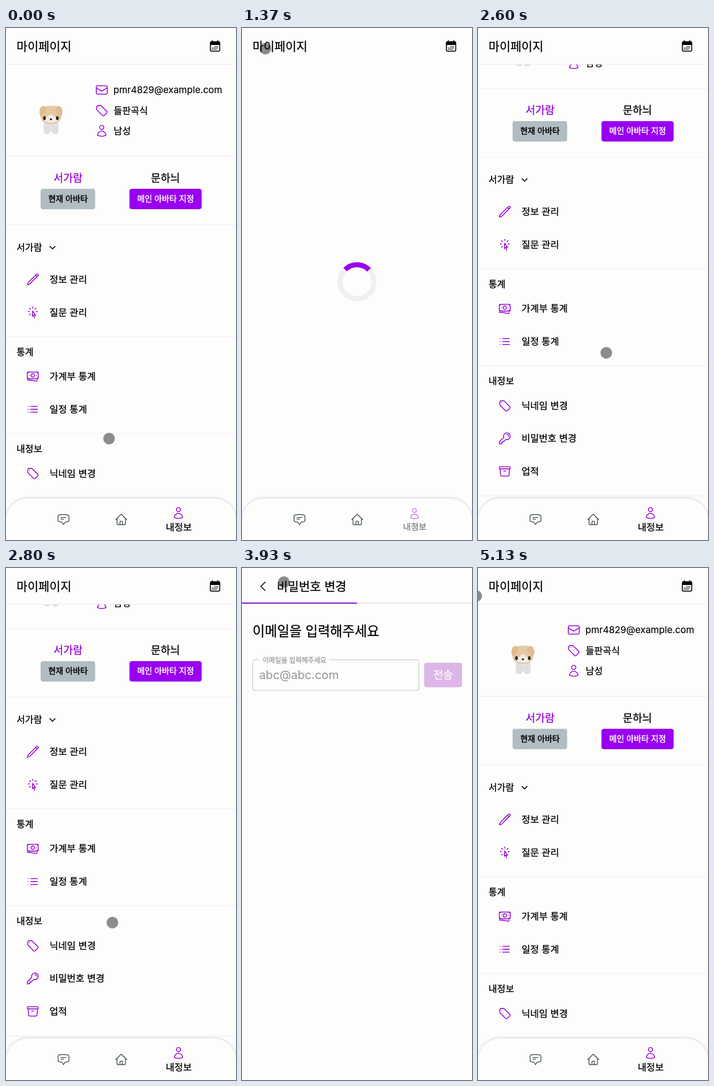
Recreate the animation shown at these times as an HTML page. Size 502 by 1116 pixels, loop 5.16 s.

```html
<!DOCTYPE html>
<html lang="ko">
<head>
<meta charset="utf-8">
<title>마이페이지</title>
<style>
  html, body { margin: 0; width: 100%; height: 100%; overflow: hidden; background: #fdfdfc; }
  svg { display: block; width: 100%; height: 100%; }
  text { font-family: "Noto Sans CJK KR", "Noto Sans CJK", "Noto Sans CJK JP", sans-serif; fill: currentColor; stroke: currentColor; stroke-width: .35px; }
  text.latin { font-family: Inter, sans-serif; stroke-width: .15px; }
  text.strong { stroke-width: .6px; }
  .bar { filter: drop-shadow(0 -2px 2.5px rgba(40, 30, 60, .16)); }
</style>
</head>
<body>
<svg id="stage" viewBox="0 0 502 1116" preserveAspectRatio="none"></svg>
<script>
const LOOP = 5160;
const VIOLET = '#9400d3', BRIGHT = '#9900f0', SLATE = '#4c5a5c', PAPER = '#fdfdfc';

const ICONS = {
  mail: 'M21.75 6.75v10.5a2.25 2.25 0 01-2.25 2.25h-15a2.25 2.25 0 01-2.25-2.25V6.75m19.5 0A2.25 2.25 0 0019.5 4.5h-15a2.25 2.25 0 00-2.25 2.25m19.5 0v.243a2.25 2.25 0 01-1.07 1.916l-7.5 4.615a2.25 2.25 0 01-2.36 0L3.32 8.91a2.25 2.25 0 01-1.07-1.916V6.75',
  tag: 'M9.568 3H5.25A2.25 2.25 0 003 5.25v4.318c0 .597.237 1.17.659 1.591l9.581 9.581c.699.699 1.78.872 2.607.33a18.095 18.095 0 005.223-5.223c.542-.827.369-1.908-.33-2.607L11.16 3.66A2.25 2.25 0 009.568 3zM6 6h.01',
  user: 'M15.75 6a3.75 3.75 0 11-7.5 0 3.75 3.75 0 017.5 0zM4.501 20.118a7.5 7.5 0 0114.998 0A17.933 17.933 0 0112 21.75c-2.676 0-5.216-.584-7.499-1.632z',
  pencil: 'M16.862 4.487l1.687-1.688a1.875 1.875 0 112.652 2.652L6.832 19.82a4.5 4.5 0 01-1.897 1.13l-2.685.8.8-2.685a4.5 4.5 0 011.13-1.897L16.863 4.487zm0 0L19.5 7.125',
  click: 'M15.042 21.672L13.684 16.6m0 0l-2.51 2.225.569-9.47 5.227 7.917-3.286-.672zM12 2.25V4.5m5.834.166l-1.591 1.591M20.25 10.5H18M7.757 14.743l-1.59 1.59M6 10.5H3.75m4.007-4.243l-1.59-1.59',
  cash: 'M2.25 18.75a60.07 60.07 0 0115.797 2.101c.727.198 1.453-.342 1.453-1.096V18.75M3.75 4.5v.75A.75.75 0 013 6h-.75M3.375 4.5h17.25a1.125 1.125 0 011.125 1.125v9.75a1.125 1.125 0 01-1.125 1.125H3.375a1.125 1.125 0 01-1.125-1.125v-9.75A1.125 1.125 0 013.375 4.5zM20.25 4.5v.75c0 .414.336.75.75.75h.75M21.75 15H21a.75.75 0 00-.75.75v.75M3.75 16.5v-.75A.75.75 0 003 15h-.75M15 10.5a3 3 0 11-6 0 3 3 0 016 0zM18 10.5h.01M6 10.5h.01',
  list: 'M8.25 6.75h12M8.25 12h12m-12 5.25h12M3.75 6.75h.01M3.75 12h.01M3.75 17.25h.01',
  key: 'M15.75 5.25a3 3 0 013 3m3 0a6 6 0 01-7.029 5.912c-.563-.097-1.159.026-1.563.43L10.5 17.25H8.25v2.25H6v2.25H2.25v-2.818c0-.597.237-1.17.659-1.591l6.499-6.499c.404-.404.527-1 .43-1.563A6 6 0 1121.75 8.25z',
  box: 'M20.25 7.5l-.625 10.632a2.25 2.25 0 01-2.247 2.118H6.622a2.25 2.25 0 01-2.247-2.118L3.75 7.5M10 11.25h4M3.375 7.5h17.25c.621 0 1.125-.504 1.125-1.125v-1.5c0-.621-.504-1.125-1.125-1.125H3.375c-.621 0-1.125.504-1.125 1.125v1.5c0 .621.504 1.125 1.125 1.125z',
  home: 'M2.25 12l8.954-8.955c.44-.439 1.152-.439 1.591 0L21.75 12M4.5 9.75v10.125c0 .621.504 1.125 1.125 1.125H9.75v-4.875c0-.621.504-1.125 1.125-1.125h2.25c.621 0 1.125.504 1.125 1.125V21h4.125c.621 0 1.125-.504 1.125-1.125V9.75M8.25 21h8.25',
  chat: 'M7.5 8.25h9m-9 3H12m-9.75 1.51c0 1.6 1.123 2.994 2.707 3.227 1.129.166 2.27.293 3.423.379.35.026.67.21.865.501L12 21l2.755-4.133a1.14 1.14 0 01.865-.501 48.172 48.172 0 003.423-.379c1.584-.233 2.707-1.626 2.707-3.228V6.741c0-1.602-1.123-2.995-2.707-3.228A48.394 48.394 0 0012 3c-2.392 0-4.744.175-7.043.513C3.373 3.746 2.25 5.14 2.25 6.741v6.018z'
};

const icon = (name, x, y, color = VIOLET, s = 1.22) =>
  `<path d="${ICONS[name]}" transform="translate(${x} ${y}) scale(${s}) translate(-12 -12)" fill="none" stroke="${color}" stroke-width="1.5" stroke-linecap="round" stroke-linejoin="round"/>`;

// Hangul text placed by its vertical centre
const text = (str, x, cy, size, extra = '') =>
  `<text x="${x}" y="${cy + size * .37}" font-size="${size}" ${extra}>${str}</text>`;
const rect = (x, y, w, h, fill, r = 0) =>
  `<rect x="${x}" y="${y}" width="${w}" height="${h}" rx="${r}" fill="${fill}"/>`;
const rule = y => rect(0, y - .75, 502, 1.5, '#f1eef8');
const dot = (x, y, rx, ry, fill) => `<ellipse cx="${x}" cy="${y}" rx="${rx}" ry="${ry}" fill="${fill}"/>`;
const item = (name, str, y) => icon(name, 58.5, y) + text(str, 95, y, 20.7);
const MID = 'text-anchor="middle" ';
const STRONG = MID + 'class="strong" ';

function dog() {
  return rect(82, 202, 33, 24, '#e4e2e2', 10) +
    rect(82.5, 212, 14, 19, '#e0dedf', 5) + rect(100.5, 212, 14, 19, '#e0dedf', 5) +
    rect(75, 169.5, 46, 39.5, '#e6c8a2', 18) +
    dot(98, 199.5, 16, 7, '#f3ebe3') + dot(98, 194, 6, 6, '#f3ebe3') +
    '<path d="M84 170Q74 169 73 181Q72 192 79 193Q86 188 89 175Z" fill="#dfbd93"/>' +
    '<path d="M112 170Q122 169 123 181Q124 192 117 193Q110 188 107 175Z" fill="#dfbd93"/>' +
    dot(84, 196.5, 3, 4.2, '#2b2623') + dot(112, 196.5, 3, 4.2, '#2b2623') +
    dot(98, 199, 2.6, 2, '#2b2623');
}

function calendar() {
  let s = '<rect x="446" y="30" width="20.5" height="20.5" rx="3" fill="none" stroke="#000" stroke-width="2"/>' +
    rect(445.5, 29.5, 21.5, 7.5, '#000', 2) + rect(449, 27, 2.6, 5, '#000', 1) + rect(461, 27, 2.6, 5, '#000', 1);
  [[2, 5], [0, 5], [0, 4]].forEach(([a, b], row) => {
    for (let i = a; i < b; i++) s += rect(449.3 + i * 2.9, 39.5 + row * 3.1, 1.8, 1.8, '#000');
  });
  return s;
}

const back = title =>
  '<path d="M51 30.5L41 40L51 49.5" fill="none" stroke="#111" stroke-width="2" stroke-linejoin="round"/>' +
  text(title, 76, 40, 26.2);

const profile =
  dog() +
  icon('mail', 209, 135) + '<text class="latin" x="234.5" y="142" font-size="20.4">pmr4829@example.com</text>' +
  icon('tag', 209, 180) + text('들판곡식', 235, 180, 20.3) +
  icon('user', 209, 224) + text('남성', 235, 224, 20.3) +
  rule(280) +
  text('서가람', 135.5, 326, 23, MID + `color="${VIOLET}"`) +
  text('문하늬', 348, 326, 23, MID) +
  rect(75.5, 350.5, 119, 44.5, '#b0bdc2', 5) + text('현재 아바타', 135.5, 372, 17.7, STRONG) +
  rect(269.5, 350.5, 157.5, 44.5, BRIGHT, 5) + text('메인 아바타 지정', 348.5, 372, 17.7, STRONG + 'color="#fff"') +
  rule(429);

const menu =
  text('서가람', 23, 478.5, 20.2) +
  '<path d="M96 476L101.5 481.5L107 476" fill="none" stroke="#111" stroke-width="2.2" stroke-linecap="round" stroke-linejoin="round"/>' +
  item('pencil', '정보 관리', 548) + item('click', '질문 관리', 620) + rule(672.5) +
  text('통계', 23, 706.5, 20.2) +
  item('cash', '가계부 통계', 759) + item('list', '일정 통계', 831) + rule(883.5) +
  text('내정보', 23, 917.5, 20.2) +
  item('tag', '닉네임 변경', 971) + item('key', '비밀번호 변경', 1042) + item('box', '업적', 1114) + rule(1167.5);

const nav =
  `<rect class="bar" x="0" y="1025.5" width="502" height="180" rx="48" fill="${PAPER}"/>` +
  icon('chat', 125.5, 1071.5, SLATE) + icon('home', 251.5, 1071.5, SLATE) +
  `<g id="navIcon">${icon('user', 0, 0)}</g><text id="navText" x="377" text-anchor="middle">내정보</text>`;

const form =
  back('비밀번호 변경') +
  rect(251, 75.5, 251, 2, '#dfdce6') + rect(0, 75.3, 251, 2.5, '#7d0fc4') +
  text('이메일을 입력해주세요', 23, 137.5, 29.2) +
  '<path d="M38 200H28Q23 200 23 205V261Q23 266.5 28 266.5H381Q386 266.5 386 261V205Q386 200 381 200H190" fill="none" stroke="#d0cdd4" stroke-width="1.6"/>' +
  text('이메일을 입력해주세요', 45, 200.5, 14.7, 'color="#9c9a9f"') +
  '<text class="latin" x="37.5" y="242" font-size="25.6" color="#999">abc@abc.com</text>' +
  rect(397.5, 206.5, 82.5, 53.5, '#dcb6e6', 5) + text('전송', 439, 232.5, 23.2, STRONG + 'color="#fcf8fd"');

const stage = document.getElementById('stage');
stage.innerHTML =
  '<clipPath id="below"><rect y="79" width="502" height="1037"/></clipPath>' +
  rect(0, 0, 502, 1116, PAPER) +
  `<g id="my"><g clip-path="url(#below)"><g id="page">${profile}${menu}</g></g>${rule(79)}</g>` +
  '<g id="load"><circle cx="251" cy="553" r="37" fill="none" stroke="#f0f0f0" stroke-width="11"/>' +
  `<path id="arc" d="M224.84 526.84A37 37 0 0 1 277.16 526.84" fill="none" stroke="${BRIGHT}" stroke-width="11"/></g>` +
  `<g id="frame">${text('마이페이지', 23, 40.5, 26)}${calendar()}${nav}</g>` +
  `<g id="nick">${back('닉네임 변경')}</g>` +
  `<g id="pass">${form}</g>` +
  '<circle id="touch" r="12.5" fill="#000" fill-opacity=".45" stroke="#bbb" stroke-opacity=".6" stroke-width="1.2"/>';

const el = id => document.getElementById(id);
const show = (id, on) => el(id).setAttribute('display', on ? 'inline' : 'none');

const SCREENS = [[0, 'my'], [600, 'nick'], [1340, 'load'], [1640, 'my'], [3060, 'pass'], [4740, 'load'], [5000, 'my']];
const TOUCH = [
  [0, 225, 895], [420, 150, 971], [620, 150, 968], [1250, 46, 42], [1370, 51, 45],
  [1850, 60, 60], [2330, 227, 905], [2370, 229, 904], [2600, 280, 708], [2700, 278, 706],
  [2950, 150, 893], [3050, 150, 890], [3330, 133, 27], [3700, 110, 16], [4100, 80, 40],
  [4500, 34, 60], [4690, 45, 42], [4830, 40, 48], [5130, -4, 61], [5160, -8, 61]
];
const SCROLL = [[0, 0], [2370, 0], [2600, 147.5], [4740, 147.5], [4741, 0], [LOOP, 0]];

// Eased values of a track at time t
function sample(track, t) {
  let i = 1;
  while (i < track.length - 1 && t >= track[i][0]) i++;
  const a = track[i - 1], b = track[i];
  const p = Math.min(1, (t - a[0]) / (b[0] - a[0]));
  const e = p * p * (3 - 2 * p);
  return a.slice(1).map((v, k) => v + (b[k + 1] - v) * e);
}

function draw(t) {
  const screen = SCREENS.filter(s => s[0] <= t).pop()[1];
  ['my', 'load', 'nick', 'pass'].forEach(id => show(id, id === screen));
  show('frame', screen === 'my' || screen === 'load');

  el('page').setAttribute('transform', `translate(0 ${-sample(SCROLL, t)[0]})`);

  const start = t >= 4740 ? 4740 : 1340;
  const turn = Math.max(0, t - start - 30) * 360 / 700;
  el('arc').setAttribute('transform', `rotate(${turn} 251 553)`);

  const p = t < 1340 ? 1 : Math.min(1, (t - start) / 80);
  const lerp = (a, b) => a + (b - a) * p;
  const size = lerp(17.6, 20.5);
  el('navIcon').setAttribute('transform', `translate(376.5 ${lerp(1059.5, 1057)}) scale(${lerp(.9, 1)})`);
  el('navIcon').setAttribute('opacity', lerp(.25, 1));
  el('navText').setAttribute('font-size', size);
  el('navText').setAttribute('y', lerp(1086, 1088) + size * .37);
  el('navText').setAttribute('opacity', lerp(.2, 1));

  const [x, y] = sample(TOUCH, t);
  el('touch').setAttribute('cx', x);
  el('touch').setAttribute('cy', y);
}

const began = performance.now();
function tick() {
  draw((performance.now() - began) % LOOP);
  requestAnimationFrame(tick);
}
tick();
</script>
</body>
</html>
```
